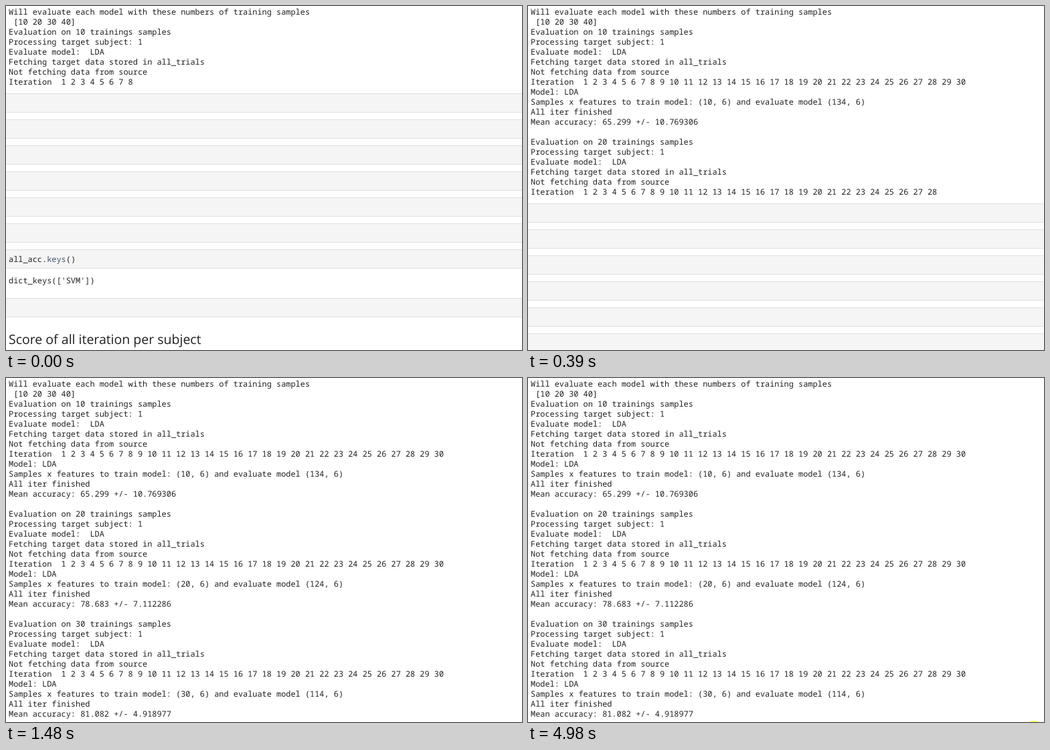
An HTML page for the animation above (5060 ms loop, 771 by 516 pixels).

```html
<!DOCTYPE html>
<html lang="en">
<head>
<meta charset="utf-8">
<title>Notebook evaluation run</title>
<style>
  html, body { margin: 0; width: 100%; height: 100%; overflow: hidden; background: #fff; }
  svg { display: block; }
  text { white-space: pre; fill: #212121; text-rendering: geometricPrecision; }
  .code { font: 11.912px "Noto Sans Mono", "DejaVu Sans Mono", monospace; }
  .title { font: 500 19.5px "Open Sans", "Noto Sans", sans-serif; }
  .cell { fill: #f5f5f5; stroke: #e0e0e0; }
  .property { fill: #44546a; }
</style>
</head>
<body>
<svg width="771" height="516" viewBox="0 0 771 516">
  <g id="output"></g>
  <g id="cells">
    <g id="empty"></g>
    <rect class="cell" x="-1" y="234.5" width="773" height="28"/>
    <text class="code" x="4" y="253">all_acc.<tspan class="property">keys</tspan>()</text>
    <text class="code" x="4" y="285">dict_keys(['SVM'])</text>
    <rect class="cell" x="-1" y="307.5" width="773" height="28"/>
    <text class="title" x="4" y="376">Score of all iteration per subject</text>
  </g>
  <path id="cursor" d="M.5 .5V16.5L4.2 13L6.6 18.9L8.8 18L6.4 12.2H11.5Z" fill="#fff" stroke="#222"/>
  <circle id="halo" cx="756" cy="527" r="13" fill="#ffff4d"/>
</svg>
<script>
const LOOP = 5060;
const LINE = 15, BASE = 13, CELL_GAP = 39;
const ACCURACY = ["65.299 +/- 10.769306", "78.683 +/- 7.112286", "81.082 +/- 4.918977"];

// [start ms, running block, last iteration printed]
const PROGRESS = [
  [0, 0, 8], [80, 1, 14], [160, 1, 21], [390, 1, 28], [620, 2, 5],
  [770, 2, 10], [1010, 2, 18], [1170, 2, 25], [1480, 3, 1]
];

const byId = id => document.getElementById(id);
const output = byId("output"), cells = byId("cells");
const cursor = byId("cursor"), halo = byId("halo");

function add(parent, tag, attrs, text = "") {
  const node = document.createElementNS("http://www.w3.org/2000/svg", tag);
  for (const key in attrs) node.setAttribute(key, attrs[key]);
  node.textContent = text;
  parent.append(node);
}

function show(node, visible) {
  node.setAttribute("visibility", visible ? "visible" : "hidden");
}

function blockLines(block, last) {
  const samples = 10 * (block + 1);
  const counts = Array.from({ length: last }, (_, i) => i + 1).join(" ");
  return [
    `Evaluation on ${samples} trainings samples`,
    "Processing target subject: 1",
    "Evaluate model:  LDA",
    "Fetching target data stored in all_trials",
    "Not fetching data from source",
    `Iteration  ${counts}`
  ];
}

function resultLines(block) {
  const samples = 10 * (block + 1);
  return [
    "Model: LDA",
    `Samples x features to train model: (${samples}, 6) and evaluate model (${144 - samples}, 6)`,
    "All iter finished",
    `Mean accuracy: ${ACCURACY[block]}`,
    ""
  ];
}

function drawOutput([, running, last]) {
  const lines = [
    "Will evaluate each model with these numbers of training samples",
    " [10 20 30 40]"
  ];
  for (let b = 0; b < running; b++) lines.push(...blockLines(b, 30), ...resultLines(b));
  lines.push(...blockLines(running, last));

  output.replaceChildren();
  lines.forEach((line, i) =>
    add(output, "text", { class: "code", x: 4, y: BASE + LINE * i }, line));
  cells.setAttribute("transform", `translate(0 ${BASE + LINE * lines.length - 2})`);
}

function drawCursor(t) {
  const step = Math.floor((t - 4200) / 80);
  show(cursor, step >= 0 && step < 6);
  const p = Math.pow(Math.max(0, step) / 5, 1.3);
  const x = Math.round(696 - 35 * p), y = Math.round(453 + 57 * p);
  cursor.setAttribute("transform", `translate(${x} ${y})`);
  show(halo, t >= 4980);
}

let current = null;
function frame() {
  const t = performance.now() % LOOP;
  const state = PROGRESS.findLast(([start]) => t >= start);
  if (state !== current) drawOutput(current = state);
  drawCursor(t);
  requestAnimationFrame(frame);
}

for (let i = 0; i < 6; i++) {
  add(byId("empty"), "rect", { class: "cell", x: -1, y: 0.5 + CELL_GAP * i, width: 773, height: 28 });
}
frame();
</script>
</body>
</html>
```
